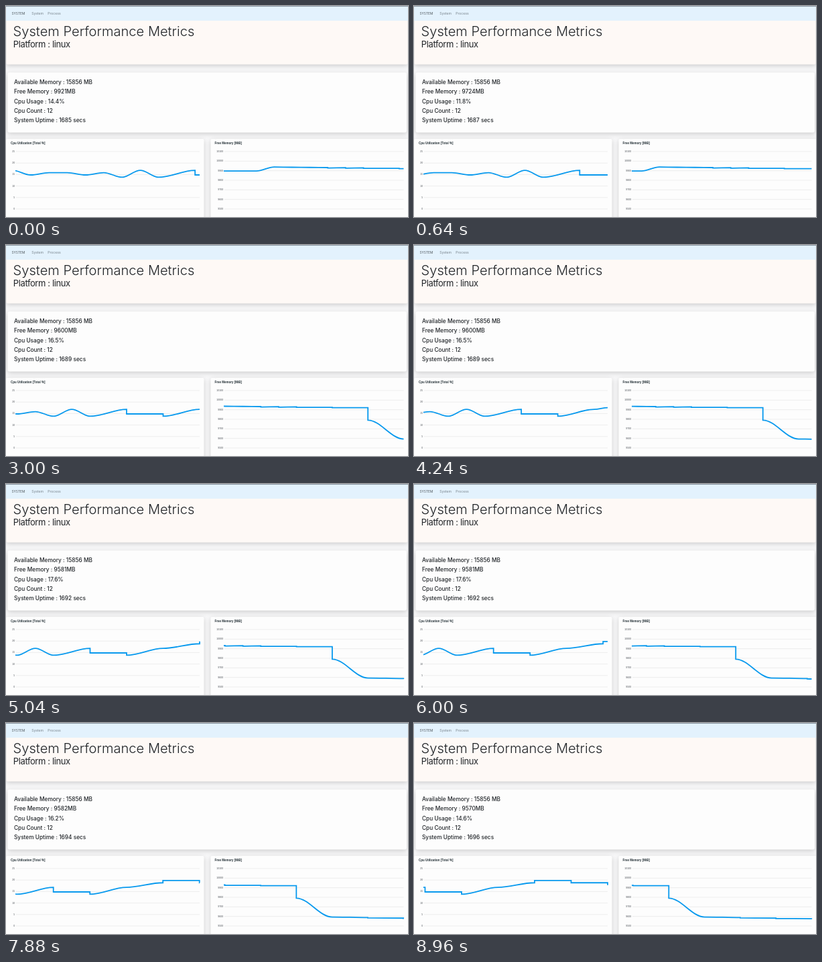
Animation, 600 px wide and 316 px high, one loop 9 s. Source, as an HTML page:

```html
<!DOCTYPE html>
<html lang="en">
<head>
<meta charset="utf-8">
<title>System Performance Metrics</title>
<style>
  html, body { margin: 0; width: 100%; height: 100%; overflow: hidden; background: #f8f8f9; }
  svg { display: block; width: 600px; height: 316px; }
  text { font-family: Inter, "Open Sans", sans-serif; fill: #212529; }
  .card { fill: #fdfdfd; filter: drop-shadow(0 2px 3.5px rgba(0, 0, 0, .18)); }
  .intro { fill: #fef9f6; }
  .nav { font-size: 5.1px; fill: #77828a; }
  .brand { font-size: 4.9px; fill: #4e565c; }
  .heading { font-size: 20.1px; font-weight: 300; }
  .platform { font-size: 13px; letter-spacing: -.03em; }
  .info text { font-size: 8.3px; font-weight: 500; }
  .chart text { font-family: "Liberation Sans", Arial, sans-serif; font-size: 3.6px; fill: #4a4f55; text-anchor: end; }
  .chart .title { font-size: 4.5px; font-weight: 700; fill: #263238; text-anchor: start; }
  .grid { stroke: #e3e3e3; stroke-width: .6; }
  .line { fill: none; stroke: #0799ee; stroke-width: 1.8; }
</style>
</head>
<body>
<svg id="stage" viewBox="0 0 600 316">
  <rect class="card intro" x=".5" y="10" width="599" height="77.5" rx="2"/>
  <rect width="600" height="22" fill="#e3f2fd"/>
  <rect width="600" height="1" fill="#8b98a2"/>
  <text class="brand" x="8.4" y="13">SYSTEM</text>
  <text class="nav" x="38.2" y="13">System</text>
  <text class="nav" x="62.2" y="13">Process</text>
  <text class="heading" x="10.6" y="45">System Performance Metrics</text>
  <text class="platform" x="10.8" y="61.8">Platform : linux</text>
  <rect class="card" x="2.5" y="99.5" width="595.5" height="90" rx="3"/>
  <g id="info" class="info"></g>
  <rect class="card" x="0" y="199" width="295.5" height="130" rx="2"/>
  <rect class="card" x="305.5" y="199" width="296" height="130" rx="2"/>
</svg>
<script>
const LOOP = 9000, TICK = 40, PERIOD = 2000, SLIDE = 1000;
const LEAD = 125;        // the first slide is already under way
const STEP_AT = 1080;    // when the next jump shows, after a slide begins
const LABEL_AT = 340;    // first change of the readings
const TOP = 218, BASE = 304;

const stage = document.getElementById('stage');

function add(parent, tag, attrs, text) {
  const el = document.createElementNS('http://www.w3.org/2000/svg', tag);
  for (const key in attrs) el.setAttribute(key, attrs[key]);
  if (text !== undefined) el.textContent = text;
  parent.appendChild(el);
  return el;
}

// Each rule gives [value, value after a jump] at a sample.
const cpuKeys = [[17, 15], [15, 14], [17, 17], [19, 20], [20, 19], [19, 18]];

function cpuLoad(index, n) {
  if (index >= 0) return cpuKeys[index];
  const swing = Math.min(1.5, .4 * (n - 3.6));
  const value = Math.round(15.5 + (n % 2 ? -swing : swing));
  return [value, value];
}

function freeMemory(index) {
  if (index < -3.5) return [9897, 9897];
  if (index === 1) return [9921, 9790];
  const value = index < 2 ? 9938 - 3.6 * (index + 3.5) : 9600 - 6 * (index - 1);
  return [value, value - (index >= -2 && index !== 2 ? 4 : 0)];
}

// Samples are half a unit apart at first, then one unit.
function sample(rule) {
  const points = [];
  for (let index = -5; index <= 5; index += index < -1 ? .5 : 1) {
    points.push([index, ...rule(index, points.length + 1)]);
  }
  return points;
}

const charts = [
  { title: 'Cpu Utilization [Total %]', titleX: 7, left: 15, right: 289, gap: 54.5,
    min: 0, max: 25, step: 5, drop: .6, points: sample(cpuLoad) },
  { title: 'Free Memory [MiB]', titleX: 311.5, left: 326, right: 593.5, gap: 53.3,
    min: 9500, max: 10100, step: 100, drop: 0, points: sample(freeMemory) }
];

charts.forEach((c, i) => {
  const g = add(stage, 'g', { class: 'chart' });
  c.y = v => BASE - (v - c.min) / (c.max - c.min) * (BASE - TOP);
  add(g, 'text', { class: 'title', x: c.titleX, y: 207.4 }, c.title);
  for (let v = c.min; v <= c.max; v += c.step) {
    const y = c.y(v);
    add(g, 'line', { class: 'grid', x1: c.left, x2: c.right, y1: y, y2: y });
    add(g, 'text', { x: c.left - 1.8, y: y + 1 }, v);
  }
  const clip = add(g, 'clipPath', { id: 'plot' + i });
  add(clip, 'rect', { x: c.left - 1, y: 205, width: c.right - c.left + 2, height: 111 });
  const plot = add(g, 'g', { 'clip-path': `url(#plot${i})` });
  c.line = add(plot, 'path', { class: 'line', transform: `translate(0 ${c.drop})` });
});

const info = document.getElementById('info');
const rows = Array.from({ length: 5 }, (_, i) => add(info, 'text', { x: 12, y: 117.3 + 14.1 * i }));

const free = [9921, 9724, 9600, 9581, 9582, 9570];
const usage = [14.4, 11.8, 16.5, 17.6, 16.2, 14.6];

function showInfo(t) {
  const k = Math.floor((t - LABEL_AT) / PERIOD) + 1;
  const lines = ['Available Memory : 15856 MB', `Free Memory : ${free[k]}MB`,
    `Cpu Usage : ${usage[k]}%`, 'Cpu Count : 12',
    `System Uptime : ${Math.round(1685 + 2.2 * k)} secs`];
  rows.forEach((row, i) => {
    if (row.textContent !== lines[i]) row.textContent = lines[i];
  });
}

function linePath(c, t) {
  const count = Math.floor((t + LEAD) / PERIOD);
  const phase = (t + LEAD) % PERIOD;
  const p = Math.min(1, phase / SLIDE);
  let d = '', px, py, last;
  for (const [index, value, jump] of c.points) {
    if (index > count + 1) break;
    const fresh = index > count;
    const x = Math.min(c.right, c.right - c.gap * (count + p - index));
    const y = c.y(fresh ? last + (value - last) * p : value);
    const bend = (x - px) * .35;
    d += d ? `C${px + bend} ${py} ${x - bend} ${y} ${x} ${y}` : `M${x} ${y}`;
    px = x;
    py = y;
    last = value;
    if (jump !== value && (!fresh || phase >= STEP_AT)) {
      last = jump;
      py = c.y(jump);
      d += `V${py}`;
    }
  }
  return d;
}

const start = performance.now();
function draw() {
  const time = Math.max(0, performance.now() - start) % LOOP;
  const t = Math.floor(time / TICK) * TICK;
  showInfo(t);
  charts.forEach(c => c.line.setAttribute('d', linePath(c, t)));
  requestAnimationFrame(draw);
}
draw();
</script>
</body>
</html>
```
